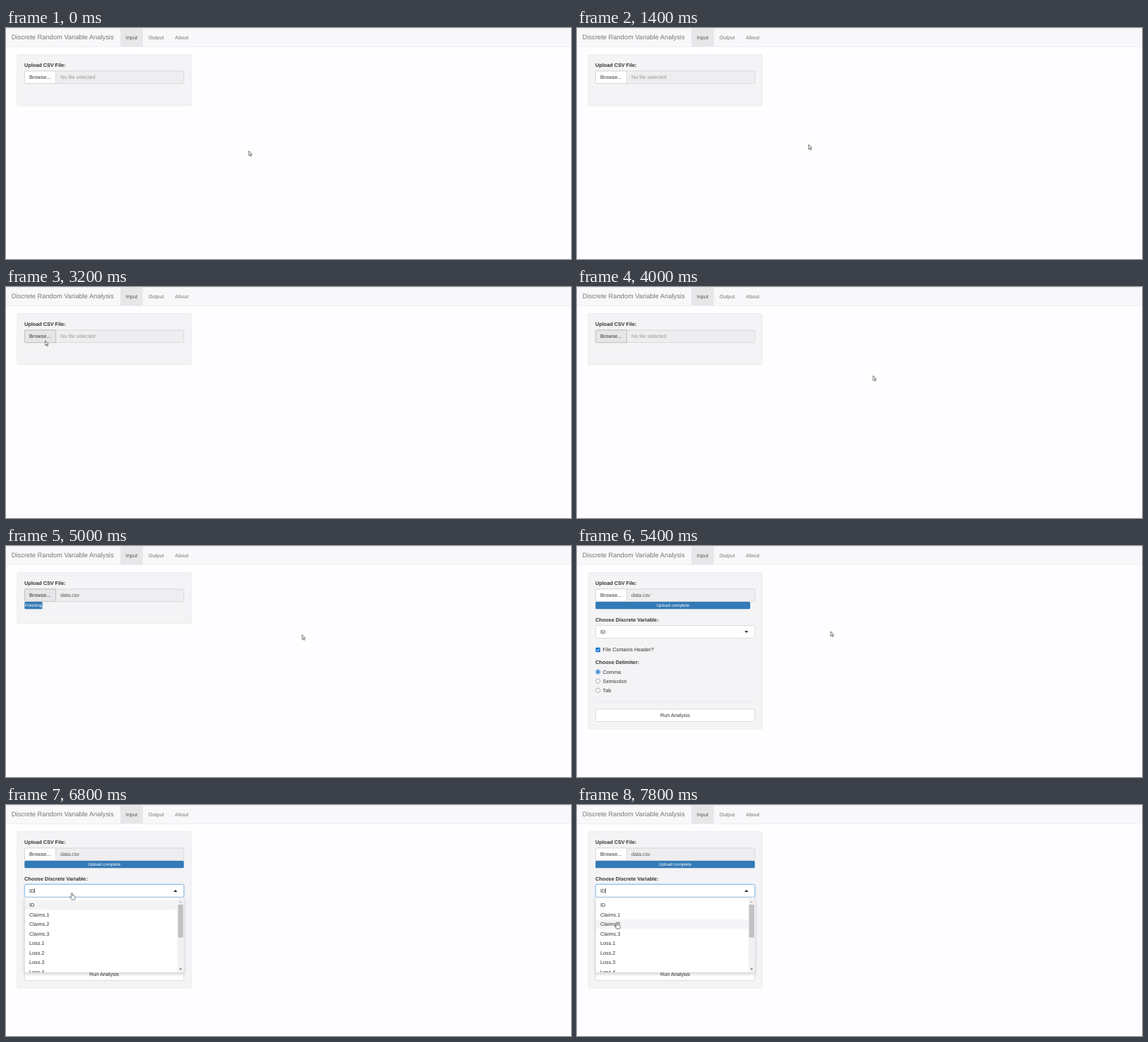
An HTML page for the animation above (8000 ms loop, 800 by 327 pixels).

```html
<!DOCTYPE html>
<html lang="en">
<head>
<meta charset="utf-8">
<title>Discrete Random Variable Analysis</title>
<style>
html, body { margin: 0; width: 100%; height: 100%; overflow: hidden; background: #fefdff; }
svg { display: block; width: 800px; height: 327px; }
text {
  font: 7.25px "Liberation Sans", Arial, sans-serif;
  fill: #333;
  text-rendering: geometricPrecision;
}
.brand { font-size: 9.32px; }
.nav text { fill: #777; }
.nav .on { fill: #555; }
.bold { font-weight: 700; }
.mid { text-anchor: middle; }
.small { font-size: 6.2px; fill: #fff; text-anchor: middle; }
.well { fill: #f4f3f5; stroke: #e2e1e3; stroke-width: .6; }
.box { fill: #fff; stroke: #c9c8ca; stroke-width: .6; }

/* every state holds for 200 ms = 2.5% */
.t { animation: 8s step-end infinite; }
.well { animation-name: well; }
.hover { animation-name: hover; }
.empty { animation-name: empty; }
.file { animation-name: file; }
.finish { animation-name: finish; }
.form { animation-name: form; }
.bar { animation-name: bar; }
.done { animation-name: done; }
.drop { animation-name: drop; }
.closed { animation-name: closed; }
.row { animation-name: row; }
.caret { animation-name: caret; }
.cursor { animation-name: move; }
.arrow { animation-name: arrow; }
.hand { animation-name: hand; }

@keyframes well { 0% { height: 72.3px } 65%, 100% { height: 221.4px } }
@keyframes hover { 0% { opacity: 0 } 25% { opacity: 1 } 65%, 100% { opacity: 0 } }
@keyframes empty { 0% { opacity: 1 } 62.5%, 100% { opacity: 0 } }
@keyframes file { 0% { opacity: 0 } 62.5%, 100% { opacity: 1 } }
@keyframes finish { 0% { opacity: 0 } 62.5% { opacity: 1 } 65%, 100% { opacity: 0 } }
@keyframes form { 0% { opacity: 0 } 65%, 100% { opacity: 1 } }
@keyframes bar {
  0% { width: 0 }
  62.5% { width: 25.4px }
  65% { width: 166px }
  67.5% { width: 219px }
  70%, 100% { width: 225.6px }
}
@keyframes done {
  0% { transform: translateX(109.2px) }
  67.5% { transform: translateX(135.7px) }
  70%, 100% { transform: translateX(139px) }
}
@keyframes drop { 0% { opacity: 0 } 85%, 100% { opacity: 1 } }
@keyframes closed { 0% { opacity: 1 } 85%, 100% { opacity: 0 } }
@keyframes row {
  0% { transform: none }
  95% { transform: translateY(13.55px) }
  97.5%, 100% { transform: translateY(27.1px) }
}
@keyframes caret { 0% { opacity: 1 } 92.5% { opacity: 0 } 97.5%, 100% { opacity: 1 } }
@keyframes move {
  0% { transform: translate(343.8px, 174px) }
  17.5% { transform: translate(328px, 165px) }
  20% { transform: translate(226px, 127px) }
  22.5% { transform: translate(93px, 88px) }
  25% { transform: translate(55.4px, 74.6px) }
  40% { transform: translate(55.6px, 76px) }
  42.5% { transform: translate(124px, 100px) }
  45% { transform: translate(262px, 131px) }
  47.5% { transform: translate(384px, 136px) }
  50% { transform: translate(419.3px, 125.6px) }
  65% { transform: translate(408px, 124.6px) }
  67.5% { transform: translate(359.2px, 121px) }
  70% { transform: translate(268px, 118px) }
  72.5% { transform: translate(160px, 120px) }
  75% { transform: translate(106px, 123.5px) }
  77.5% { transform: translate(93.4px, 124.6px) }
  90% { transform: translate(90px, 131px) }
  92.5% { transform: translate(82px, 139px) }
  95% { transform: translate(66px, 154px) }
  97.5%, 100% { transform: translate(56.6px, 166px) }
}
@keyframes arrow {
  0% { opacity: 1 } 25% { opacity: 0 }
  40% { opacity: 1 } 72.5%, 100% { opacity: 0 }
}
@keyframes hand {
  0% { opacity: 0 } 25% { opacity: 1 }
  40% { opacity: 0 } 72.5%, 100% { opacity: 1 }
}
</style>
</head>
<body>
<svg viewBox="0 0 800 327">
  <defs>
    <filter id="shade" x="-10%" y="-10%" width="120%" height="125%">
      <feDropShadow dx="0" dy="2" stdDeviation="2" flood-opacity=".2"/>
    </filter>
    <filter id="glow" x="-5%" y="-30%" width="110%" height="160%">
      <feDropShadow dx="0" dy="0" stdDeviation="1.3" flood-color="#66afe9" flood-opacity=".6"/>
    </filter>
    <clipPath id="list"><rect x="26" y="131" width="217" height="105.8"/></clipPath>
  </defs>

  <g class="nav">
    <rect width="800" height="26.4" fill="#f8f7f9"/>
    <rect width="800" height=".6" fill="#e7e6e8"/>
    <rect y="26" width="800" height=".6" fill="#e7e6e8"/>
    <rect x="162" width="31.8" height="26.3" fill="#e7e6e8"/>
    <text class="brand" x="7.8" y="16.3">Discrete Random Variable Analysis</text>
    <text class="on" x="169.8" y="15.6">Input</text>
    <text x="201.7" y="15.6">Output</text>
    <text x="239.3" y="15.6">About</text>
  </g>

  <rect class="t well" x="15.8" y="37.7" width="246.5" height="72.3" rx="2"/>
  <text class="bold" x="26.1" y="55.2">Upload CSV File:</text>

  <rect x="26.4" y="61" width="225.4" height="17.6" rx="2" fill="#eeedef" stroke="#c9c8ca" stroke-width=".6"/>
  <path id="btn" d="M70.4 61H28.4a2 2 0 0 0-2 2V76.6a2 2 0 0 0 2 2H70.4Z" fill="#fff" stroke="#c9c8ca" stroke-width=".6"/>
  <path class="t hover" d="M70.4 61H28.4a2 2 0 0 0-2 2V76.6a2 2 0 0 0 2 2H70.4Z" fill="#e6e5e7" stroke="#adacae" stroke-width=".6"/>
  <text x="33" y="72.2">Browse...</text>
  <text class="t empty" x="77" y="72.2" style="fill:#999">No file selected</text>

  <g class="t file">
    <text x="77" y="72.2" style="fill:#555">data.csv</text>
    <rect x="26.2" y="79" width="225.6" height="10.3" rx="2" fill="#f5f4f6"/>
    <path d="M26.5 79.2H251.5V84" fill="none" stroke="#e6e5e7" stroke-width=".5"/>
    <rect class="t bar" x="26.2" y="79" height="10.3" rx="1.6" fill="#337ab7"/>
    <text class="t finish small" x="38.9" y="86.3">Finishing</text>
  </g>

  <g class="t form">
    <text class="t done small" x="0" y="86.3">Upload complete</text>

    <text class="bold" x="26.1" y="107.2">Choose Discrete Variable:</text>
    <rect class="box" x="26.4" y="112.6" width="225.4" height="17.8" rx="2"/>
    <path class="t closed" d="M237.2 120.2h5.4l-2.7 2.8z" fill="#222"/>

    <rect x="26.4" y="143.7" width="6.6" height="6.6" rx="1.2" fill="#1976d2"/>
    <path d="M27.9 147l1.4 1.5 2.4-3" fill="none" stroke="#fff" stroke-width="1"/>
    <text x="36.6" y="149">File Contains Header?</text>

    <text class="bold" x="26.1" y="167.1">Choose Delimiter:</text>
    <g fill="#fff" stroke="#777" stroke-width=".6">
      <circle cx="29.7" cy="178.2" r="3.1" stroke="#1976d2" stroke-width=".8"/>
      <circle cx="29.7" cy="191.2" r="3.1"/>
      <circle cx="29.7" cy="204.3" r="3.1"/>
    </g>
    <circle cx="29.7" cy="178.2" r="1.9" fill="#1976d2"/>
    <text x="36.6" y="180.6">Comma</text>
    <text x="36.6" y="193.6">Semicolon</text>
    <text x="36.6" y="206.6">Tab</text>

    <rect x="26.2" y="219.7" width="225.6" height=".6" fill="#e2e1e3"/>
    <rect class="box" x="26.4" y="230.9" width="225.4" height="17.6" rx="2"/>
    <text class="mid" x="139" y="242.2">Run Analysis</text>
  </g>

  <g class="t drop">
    <rect x="26.4" y="112.6" width="225.4" height="17.8" rx="2" fill="#fff" stroke="#66afe9" stroke-width=".7" filter="url(#glow)"/>
    <path d="M237.2 122.9h5.4l-2.7-2.8z" fill="#222"/>
    <rect class="t caret" x="40.4" y="117.8" width=".6" height="7.6" fill="#222"/>
    <rect x="26.4" y="131" width="225.4" height="106" rx="1" fill="#fff" stroke="#d0cfd1" stroke-width=".5" filter="url(#shade)"/>
    <g clip-path="url(#list)">
      <rect class="t row" x="26.7" y="134.7" width="216.3" height="13.55" fill="#f4f3f5"/>
      <g id="options"></g>
    </g>
    <rect x="243" y="132.6" width="8.4" height="104" fill="#f1f0f2"/>
    <rect x="243.6" y="141" width="7.2" height="46.5" fill="#c1c0c2"/>
    <path d="M245.4 138.2h3.6l-1.8-2z" fill="#a3a2a4"/>
    <path d="M245.4 231.4h3.6l-1.8 2z" fill="#505052"/>
  </g>
  <text class="t form" x="33" y="124">ID</text>

  <g class="t cursor" stroke-linejoin="round">
    <path class="t arrow" d="M0 0V6.6L1.5 5.3 2.5 7.7 3.6 7.2 2.6 4.9H4.5Z" fill="#fff" stroke="#333" stroke-width=".7"/>
    <path class="t hand" d="M-.9 .7a.8 .8 0 0 1 1.6 0V3.3l2.6 .5q1.1 .3 1.1 1.3V6.8L3.5 9.3H-.6L-2.8 6.1q-.3-1 .6-1L-.9 6.1Z" fill="#fff" stroke="#333" stroke-width=".7"/>
  </g>
</svg>
<script>
const names = ["ID", "Claims.1", "Claims.2", "Claims.3", "Loss.1", "Loss.2", "Loss.3", "Loss.4"];
document.getElementById("options").innerHTML = names
  .map((name, i) => `<text x="33" y="${144 + i * 13.55}">${name}</text>`)
  .join("");
</script>
</body>
</html>
```
